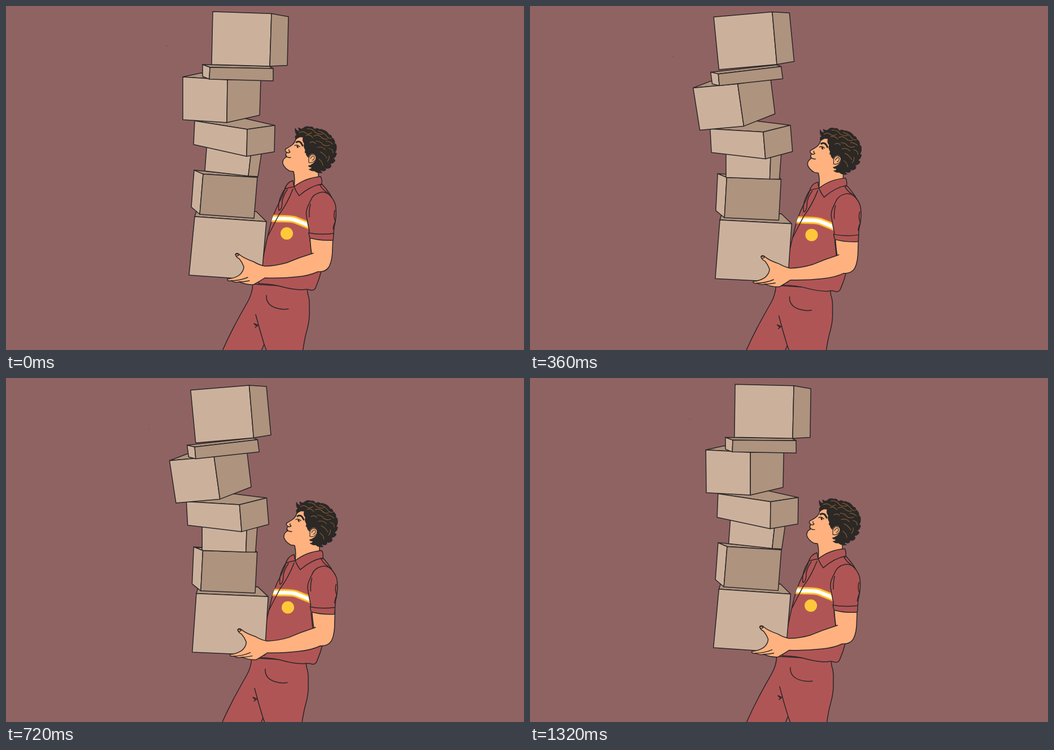
Animation, 917 px wide and 611 px high, one loop 1.35 s. Source, as an HTML page with a canvas:

```html
<!DOCTYPE html>
<html lang="en">
<head>
<meta charset="utf-8">
<title>Courier with a swaying stack</title>
<style>
html, body { margin: 0; width: 100%; height: 100%; overflow: hidden; background: #906363; }
canvas { display: block; width: 917px; height: 611px; }
</style>
</head>
<body>
<canvas id="stage" width="917" height="611"></canvas>
<script>
const ctx = document.getElementById('stage').getContext('2d');
const LOOP = 1350, STEP = 30;
const LINE = '#2a2627', LIGHT = '#cbb19c', DARK = '#ae937e';
const CLOTH = '#b05555', SKIN = '#ffb27f', HAIR = '#2b2826', STRAND = '#85592f';

// Every face is a path in rest position; sway and sink are [dx, dy, degrees].
const boxes = [
  { pivot: [334, 374], sway: [0, 0, 0], sink: [3, 8.7, -1.5], faces: [
    [DARK, 'M337 365L443 365L461 383L334 374Z'],
    [LIGHT, 'M334 374L461 383L452 487L324 478Z']] },
  { pivot: [439, 377], sway: [0, 0, -0.8], sink: [2, 5, -1.2], faces: [
    [DARK, 'M333 291.6L443 302.5L445 304.6L349 298.6Z'],
    [LIGHT, 'M333 291.6L349 298.6L343 370L328 357Z'],
    [DARK, 'M349 298.6L445 304.6L439 377L343 370Z']] },
  { pivot: [352, 293], sway: [-6, 8, -4.6], sink: [0, 7, -0.8], faces: [
    [LIGHT, 'M356 240L435 250L429 302L352 293Z'],
    [DARK, 'M435 250L454 250L446 303L429 302Z']] },
  { pivot: [426, 267], sway: [-11, 1.5, -6.5], sink: [0, 4.7, -0.7], faces: [
    [DARK, 'M334 204L372 188L476 212L427 219Z'],
    [LIGHT, 'M334 204L427 219L426 267L332 246Z'],
    [DARK, 'M427 219L476 212L475 259L426 267Z']] },
  { pivot: [313, 202], sway: [-14, 17, -10.5], sink: [-1, 6.4, -0.3], faces: [
    [DARK, 'M313 126L345 119L451 131L392 131Z'],
    [LIGHT, 'M313 126L392 131L391 207L313 202Z'],
    [DARK, 'M392 131L451 131L449 194L391 207Z']] },
  { pivot: [361, 109], sway: [-32, 8, -8.5], sink: [-1.5, 7.2, -1], faces: [
    [DARK, 'M348 104L466 107L473 111L361 109Z'],
    [LIGHT, 'M348 104L361 109L360 130L348 125Z'],
    [DARK, 'M361 109L473 111L473 133L360 130Z']] },
  { pivot: [467, 107], sway: [-36, -10, -8], sink: [0, 7.2, -0.3], speck: [285, 71], faces: [
    [LIGHT, 'M366 10L470 13.5L467 107L364 104Z'],
    [DARK, 'M470 13.5L500 19L498 105.5L467 107Z']] }
];
for (const box of boxes) box.faces = box.faces.map(([color, d]) => [color, new Path2D(d)]);

const trousers = new Path2D(`M437 494Q436 511 428 525C411 555 397 580 381 617
  L450 617L457 601L463 617L525 617Q528 592 533 575Q538 556 537 540
  Q538 520 534 511L533 500Z`);
const trouserLines = new Path2D(`M442 548Q449 575 457 601
  M461 514Q460 530 477 536Q489 540 500 538M439 564L446 567L441 571M439 564L444 569`);

const shirt = new Path2D(`M495 321Q491 335 483 350C474 367 469 383 465 402
  Q457 434 453 462L447 493Q474 494 490 499Q508 504 526 504Q533 502 541 505
  Q547 505 549 498Q555 484 558 471L550 440L565 410L583 375
  Q584 354 574 335Q568 326 560 317Z`);
const shirtLines = new Path2D(`M508 325Q498 351 483 371Q472 392 464 408
  M495 323C486 336 481 351 483 363Q489 362 489 346Q491 336 498 326
  M556 318Q560 326 568 331L577 340M541 441L538 414`);
const band = new Path2D('M471 377C486 379 500 376 512 380Q527 386 539 391');
const collar = new Path2D(`M510 321Q530 305 557 303Q560 308 559 316
  Q538 320 519 337Q513 329 510 321Z`);
const collarFront = new Path2D('M508 310Q496 314 494 325Q502 322 510 321Z');
const sleeve = new Path2D(`M557 331Q543 334 539 346C534 356 530 364 532 373
  Q534 386 537 400L536 404Q537 410 538 412Q555 417 579 416Q580 410 580 404
  Q580 393 583 383Q585 370 584 360Q584 348 574 337Q566 329 557 331Z`);
const sleeveLines = new Path2D(`M536 403Q556 407 580 404M539 352Q536 364 537 375
  M582 363Q579 373 583 382Q580 389 579 396`);

const face = new Path2D(`M513 236Q511 244 505 248Q499 252 495 254Q493 257 497 260
  L495 264Q498 268 495 269Q489 273 490 280Q493 288 502 293L509 294
  Q512 306 510 321L531 309L553 304L553 285L558 240L535 222Z`);
const faceLines = new Path2D(`M495 266Q499 270 504 269M497 260Q501 262 503 259
  M502 259Q500 257 501 255M511 248Q515 245 520 250`);
const brow = new Path2D('M514 242Q521 238 525 248');
const pupil = new Path2D('M515.5 249L516.5 251');
const hair = new Path2D(`M513 237Q510 230 515 229Q511 225 512 217Q515 223 520 222
  Q517 219 518 216Q523 220 526 217Q531 212 538 215Q543 213 546 219
  Q552 215 557 221Q554 217 561 220Q569 222 572 229Q576 228 577 234
  Q583 237 582 245Q585 244 585 250Q586 256 582 261Q586 260 585 263
  Q584 269 579 271Q584 273 582 276Q579 280 574 280Q577 285 574 287
  Q570 290 565 288Q568 292 563 293Q558 293 556 291Q557 295 560 296
  Q552 298 546 293Q541 294 536 290Q541 290 541 286Q537 287 535 284
  Q544 282 549 273Q550 263 543 262Q537 263 535 269Q531 265 531 261
  Q528 262 530 256Q526 250 528 244Q524 240 526 233Q520 232 517 234Z`);
const strands = new Path2D(`M519 225Q526 221 531 226Q536 229 541 225
  M533 218Q542 217 547 224Q553 229 561 227M553 222Q563 224 569 233Q572 236 576 235
  M545 231Q552 227 558 233Q563 238 569 236M531 230Q538 227 543 234
  M549 240Q557 240 561 246Q566 250 573 247M566 240Q573 240 578 245
  M538 243Q543 239 548 244M551 251Q560 249 565 255M572 253Q579 254 579 261
  M556 259Q563 262 568 270M572 266Q573 271 569 276M554 272Q560 276 561 283`);
const ear = new Path2D('M536 270Q539 262 545 264Q551 266 548 273Q543 280 536 278Z');
const earLine = new Path2D('M539 271Q543 264 546 268Q546 273 542 274');

const arm = new Path2D(`M538 408Q539 428 541 440Q518 447 497 456Q476 462 458 462
  Q448 460 438 454Q421 448 414 442Q409 437 406 441Q407 446 413 449Q418 455 421 463
  Q421 471 413 478Q404 484 392 485Q391 489 399 488Q404 492 413 490Q424 495 438 495
  Q449 489 458 483Q488 484 515 481Q537 479 552 472Q566 473 572 463
  Q578 451 578 430L579 408Z`);
const armLines = new Path2D(`M398 488Q414 488 428 482M412 490Q422 490 431 488
  M407 441L411 440L412 443L408 444M541 440L544 439`);

function ink(path, fill, width = 1.5, stroke = LINE) {
  if (fill) { ctx.fillStyle = fill; ctx.fill(path); }
  ctx.lineWidth = width;
  ctx.strokeStyle = stroke;
  ctx.stroke(path);
}

// Draws with a shift and a turn about a pivot.
function posed(dx, dy, paint, angle = 0, [px, py] = [0, 0]) {
  ctx.save();
  ctx.translate(px + dx, py + dy);
  ctx.rotate(angle);
  ctx.translate(-px, -py);
  paint();
  ctx.restore();
}

// Quick lean out, slow recovery, quick snap back.
function swayAt(t) {
  if (t < 480) { const u = t / 480; return u + 0.44 * u * (1 - u); }
  if (t < 1110) return 1 - 0.54 * (t - 480) / 630;
  return 0.46 * (LOOP - t) / 240;
}
const sinkAt = t => Math.min(t / 520, 1, (LOOP - t) / 240);
const bodyAt = t => Math.min(t / 480, 1, (LOOP - t) / 630);

function drawBox({ pivot, sway, sink, faces, speck }, s, d) {
  const [dx, dy, degrees] = sway.map((v, i) => v * s + sink[i] * d);
  posed(dx, dy, () => {
    for (const [color, path] of faces) ink(path, color);
    if (speck) {
      ctx.fillStyle = '#5d4244';
      ctx.fillRect(speck[0] - 0.6, speck[1] - 0.6, 1.2, 1.2);
    }
  }, degrees * Math.PI / 180, pivot);
}

function drawHead() {
  ink(face, SKIN);
  ink(faceLines, null, 1.4);
  ink(brow, null, 3);
  ink(pupil, null, 2.6);
  ink(hair, HAIR, 0.8);
  ink(strands, null, 1.2, STRAND);
  ink(ear, SKIN, 1.2);
  ink(earLine, null, 1.1);
}

function drawTorso() {
  ink(shirt, CLOTH);
  ctx.save();
  ctx.clip(shirt);
  ink(band, null, 14, '#dc6f45');
  ink(band, null, 12, '#ffc62e');
  ink(band, null, 6.5, '#ffffff');
  ctx.restore();
  ink(shirtLines);
  ctx.fillStyle = '#ffc83a';
  ctx.beginPath();
  ctx.arc(497, 404, 11, 0, 7);
  ctx.fill();
}

function draw(t) {
  const s = swayAt(t), d = sinkAt(t), b = bodyAt(t);
  ctx.fillStyle = '#906363';
  ctx.fillRect(0, 0, 917, 611);
  ctx.lineJoin = ctx.lineCap = 'round';

  posed(-2 * b, 3 * b, () => {
    ink(trousers, CLOTH);
    ink(trouserLines);
  });
  posed(2 * b, 3.5 * b, () => {
    drawTorso();
    drawHead();
    ink(collarFront, CLOTH);
    ink(collar, CLOTH);
  });
  for (const box of boxes) drawBox(box, s, d);

  // The hand follows the lowest box while the elbow follows the body.
  const armTurn = (3.5 * b - 6 * d) / 165;
  posed(4 * d, 6 * d, () => {
    ink(arm, SKIN);
    ink(armLines);
  }, armTurn, [407, 440]);
  posed(2.5 * d, 3.5 * b, () => {
    ink(sleeve, CLOTH);
    ink(sleeveLines);
  });
}

function tick() {
  const t = performance.now() % LOOP;
  draw(Math.floor(t / STEP) * STEP);
  requestAnimationFrame(tick);
}
tick();
</script>
</body>
</html>
```
